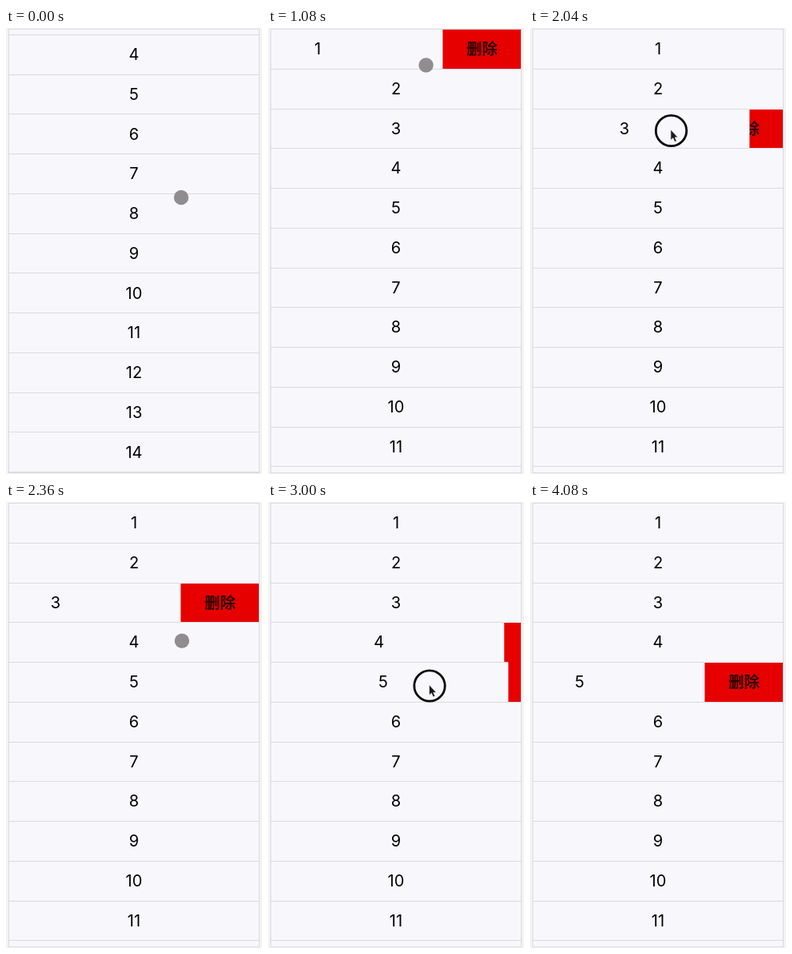
Animation, 320 px wide and 558 px high, one loop 4120 ms. Source, as an HTML page:

```html
<!DOCTYPE html>
<html lang="zh">
<head>
<meta charset="utf-8">
<style>
  html, body { margin: 0; width: 100%; height: 100%; overflow: hidden; background: #f3f3f3; }
  svg { display: block; width: 320px; height: 558px; }
  .label { font: 400 20px Inter, "Liberation Sans", sans-serif; text-anchor: middle; fill: #000; }
  .action { font: 700 19.5px "Noto Sans CJK SC", "Noto Sans CJK", sans-serif; text-anchor: middle; fill: #300000; }
  .crisp { shape-rendering: crispEdges; }
</style>
</head>
<body>
<svg viewBox="0 0 320 558">
  <defs><clipPath id="view"><rect x="3" y="1" width="314" height="556"/></clipPath></defs>
  <rect width="320" height="558" fill="#f3f3f3"/>
  <rect x="3" y="1" width="314" height="556" fill="#f8f7fb"/>
  <g clip-path="url(#view)"><g id="list"></g></g>
  <rect x="3.5" y="1.5" width="313" height="555" fill="none" stroke="#dbdadd"/>
  <g id="pointer">
    <circle id="dot" r="9.2" fill="#8f8d90"/>
    <g id="press">
      <circle r="19.2" fill="none" stroke="#080808" stroke-width="2.8"/>
      <path transform="translate(-.7 -.5)" d="M0 -1V12.5L3 9.8L5.1 14.5L7.6 13.4L5.5 8.9H9.3Z" fill="#1a1a1a" stroke="#fff" stroke-width=".8"/>
    </g>
  </g>
</svg>
<script>
const LOOP = 4120, STEP = 40;
const PITCH = 49.75, TOP = 1.5, OPEN = 98, SCROLL = 142.4;
const DRAG_TIME = 190, DRAG_SPEED = 0.4;
const $ = id => document.getElementById(id);

const clamp = (v, lo = 0, hi = 1) => Math.min(hi, Math.max(lo, v));
const easeOut = p => 1 - (1 - clamp(p)) ** 3;
const smooth = p => { p = clamp(p); return p * p * (3 - 2 * p); };
const mix = (a, b, p) => a + (b - a) * p;

// Where the pointer starts, presses on each row in turn, and leaves
const enter = { at: 0, x: 219, y: 212 };
const swipes = [
  { at: 640, x: 240, y: 32 },
  { at: 1370, x: 239.5, y: 64.5 },
  { at: 1935, x: 218.5, y: 128.5 },
  { at: 2460, x: 241, y: 186 },
  { at: 2960, x: 218, y: 230 }
];
const leave = { at: 3640, x: 334, y: 300 };
const stops = [enter, ...swipes, leave];

function add(parent, tag, attrs, text) {
  const node = document.createElementNS("http://www.w3.org/2000/svg", tag);
  for (const key in attrs) node.setAttribute(key, attrs[key]);
  if (text) node.textContent = text;
  return parent.appendChild(node);
}

const rows = Array.from({ length: 15 }, (_, i) => {
  const y = TOP + i * PITCH, mid = y + PITCH / 2;
  const row = add($("list"), "g", {});
  const action = add(row, "g", {  visibility: "hidden" });
  add(action, "rect", { x: 218, y: y + .6, width: 98, height: PITCH - .55, fill: "#e60000", class: "crisp" });
  add(action, "text", { x: 267.5, y: mid + 7, class: "action" }, "删除");
  const panel = add(row, "g", {});
  add(panel, "rect", { x: 4, y, width: 312.4, height: PITCH, fill: "#f8f7fb" });
  add(panel, "path", { d: `M4 ${y}H316`, stroke: "#dbdadd", class: "crisp" });
  add(panel, "text", { x: 160, y: mid + 6.8, class: "label" }, String(i + 1));
  return { action, panel };
});

const dragAt = (swipe, t) => DRAG_SPEED * clamp(t - swipe.at, 0, DRAG_TIME);
const isHeld = (swipe, t) => t >= swipe.at && t < swipe.at + DRAG_TIME;

// Drags move left at a steady speed; the travel between them is eased
function pointerAt(t) {
  const i = stops.findLastIndex(stop => stop.at <= t);
  const from = stops[i], to = stops[i + 1] || leave;
  const swiping = swipes.includes(from);
  const x = from.x - (swiping ? dragAt(from, t) : 0);
  const free = from.at + (swiping ? DRAG_TIME : 0);
  const p = to === from ? 0 : smooth((t - free) / (to.at - free));
  return [mix(x, to.x, p), mix(from.y, to.y, p)];
}

// A released row snaps open and closes again on the next press
function offsetAt(i, t) {
  const swipe = swipes[i], next = swipes[i + 1];
  const snap = easeOut((t - swipe.at - DRAG_TIME) / 120);
  const closing = next ? easeOut((t - next.at) / 100) : 0;
  return mix(dragAt(swipe, t), OPEN, snap) * (1 - closing);
}

function draw(t) {
  const scroll = SCROLL * (1 - easeOut(t / 480));
  $("list").setAttribute("transform", `translate(0 ${-scroll})`);
  swipes.forEach((_, i) => {
    const offset = offsetAt(i, t);
    rows[i].panel.setAttribute("transform", `translate(${-offset} 0)`);
    rows[i].action.setAttribute("visibility", offset > 0 ? "visible" : "hidden");
  });
  const held = swipes.some(swipe => isHeld(swipe, t));
  $("pointer").setAttribute("transform", `translate(${pointerAt(t)})`);
  $("dot").setAttribute("visibility", held ? "hidden" : "visible");
  $("press").setAttribute("visibility", held ? "visible" : "hidden");
}

const began = performance.now();
function tick() {
  const t = (performance.now() - began) % LOOP;
  draw(Math.floor(t / STEP) * STEP);
  requestAnimationFrame(tick);
}
tick();
</script>
</body>
</html>
```
